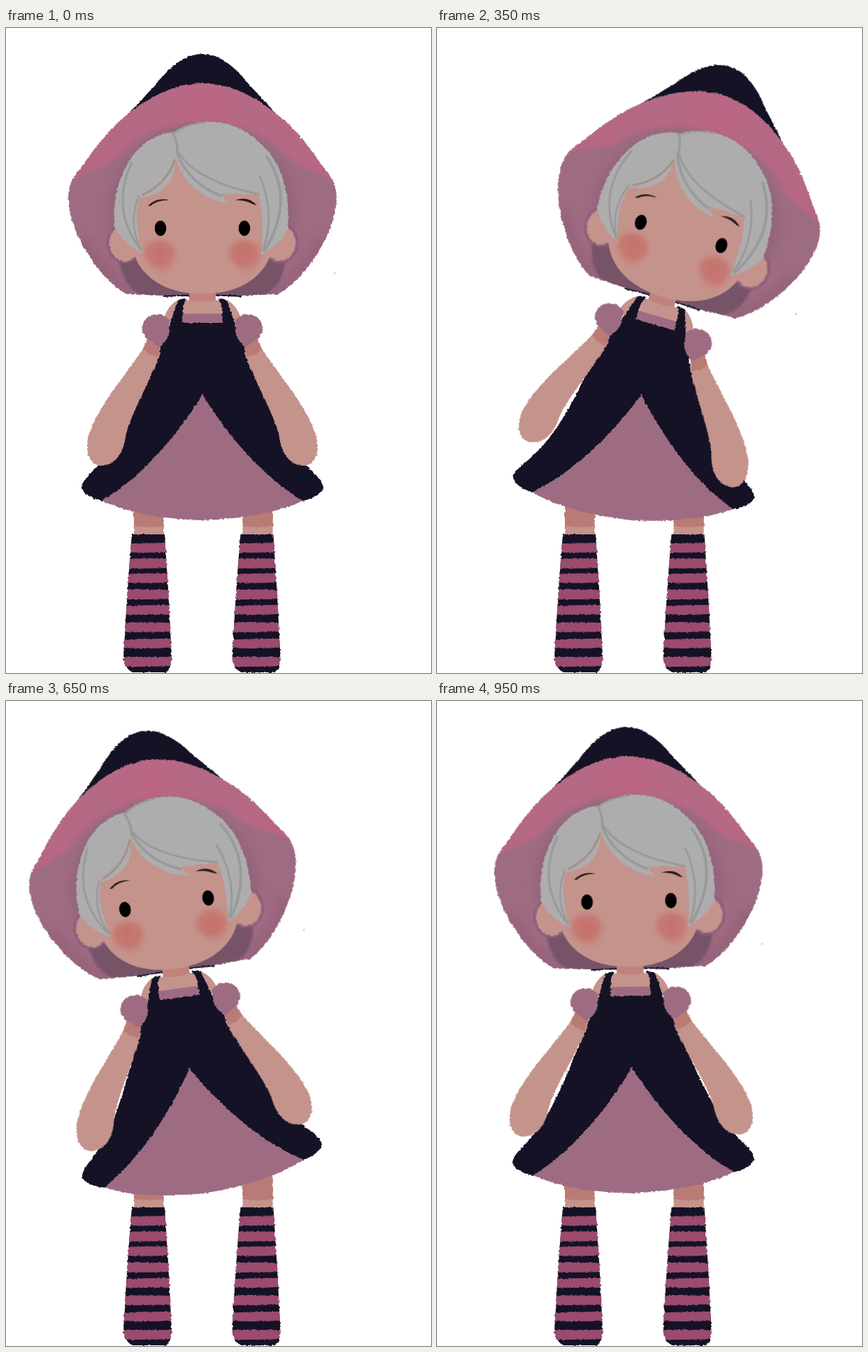
Recreate the animation shown at these times as an HTML page. Size 608 px wide and 921 px high, loop 1 s.

```html
<!DOCTYPE html>
<html lang="en">
<head>
<meta charset="utf-8">
<title>Swaying doll</title>
<style>
html, body { margin: 0; width: 100%; height: 100%; overflow: hidden; background: #fff; }
svg { display: block; width: 608px; height: 921px; }
</style>
</head>
<body>
<svg viewBox="0 0 608 921" xmlns="http://www.w3.org/2000/svg">
  <defs>
    <filter id="rough" x="-5%" y="-5%" width="110%" height="110%" color-interpolation-filters="sRGB">
      <feTurbulence type="fractalNoise" baseFrequency="0.25" numOctaves="2" seed="4"/>
      <feDisplacementMap in="SourceGraphic" scale="3.5" xChannelSelector="R" yChannelSelector="G"/>
    </filter>
    <filter id="soft" x="-20%" y="-20%" width="140%" height="140%"><feGaussianBlur stdDeviation="1.5"/></filter>
    <filter id="haze" x="-30%" y="-30%" width="160%" height="160%"><feGaussianBlur stdDeviation="7"/></filter>
    <radialGradient id="blush">
      <stop offset="0" stop-color="#c6706b"/>
      <stop offset=".6" stop-color="#c6736d" stop-opacity=".8"/>
      <stop offset="1" stop-color="#c6827b" stop-opacity="0"/>
    </radialGradient>
    <radialGradient id="pink" gradientUnits="userSpaceOnUse" cx="281" cy="112" r="190">
      <stop offset="0" stop-color="#bc6583"/>
      <stop offset=".35" stop-color="#b46984"/>
      <stop offset="1" stop-color="#b66683"/>
    </radialGradient>
    <clipPath id="brimClip"></clipPath>
    <clipPath id="sockClip"></clipPath>
  </defs>
  <g id="legs" filter="url(#rough)"></g>
  <g id="hatBone"><g id="hat" filter="url(#rough)"></g></g>
  <g id="neckBone"><g id="neck"></g></g>
  <g id="dress" filter="url(#rough)"></g>
  <g id="armBone">
    <g id="armL"></g>
    <g id="armR"></g>
  </g>
  <g id="faceBone"><g id="face"></g></g>
</svg>
<script>
const NS = 'http://www.w3.org/2000/svg';
const INK = '#151226', PLUM = '#9e6c82', SKIN = '#c4938c', SHADE = '#b97b76';
const HAIR = '#adadad', STRAND = '#959595', STRIPE = '#9a4b6e', DUSK = '#775367';
const MID = 281, HIP = 660, WAIST = 477;
const MIRROR = `translate(${2 * MID}) scale(-1 1)`;
const $ = id => document.getElementById(id);

function add(parent, tag, attrs = {}) {
  const el = document.createElementNS(NS, tag);
  for (const k in attrs) el.setAttribute(k, attrs[k]);
  (typeof parent === 'string' ? $(parent) : parent).appendChild(el);
  return el;
}

const shape = (parent, fill, d, more = {}) => add(parent, 'path', { d, fill, ...more });

// The left half and its reflection; halves overlap by a pixel
function both(parent, fill, d) {
  shape(parent, fill, d);
  shape(parent, fill, d, { transform: MIRROR });
}

function buildLegs() {
  shape('sockClip', INK, 'M180,723 H227 Q233,810 237,898 Q236,917 229,920 H181 Q169,914 168,900 Q173,805 180,723Z');
  for (const dx of [0, 155.5]) {
    const leg = add('legs', 'g', { transform: `translate(${dx})` });
    shape(leg, SKIN, 'M183,675 H226 V727 H183Z');
    shape(leg, SHADE, 'M183,675 H226 V711 Q205,715 183,711Z');
    const sock = add(leg, 'g', { 'clip-path': 'url(#sockClip)' });
    add(sock, 'rect', { x: 160, y: 715, width: 85, height: 206, fill: INK });
    for (let i = 0; i < 8; i++) {
      const y = 736 + 21 * i + .3 * i * i, tilt = i % 2 ? 1 : -1;
      shape(sock, STRIPE, `M160,${y + 1} Q200,${y - 1} 245,${y + tilt} v12 Q205,${y + 15} 160,${y + 13 + tilt}Z`);
    }
  }
}

function buildHat() {
  both('hat', INK, 'M176,122 L214,81 C236,54 256,37 282,37 V140Z');
  both('brimClip', INK, `M282,79 C235,79 195,105 165,131 C140,152 117,187 95,216
    C86,235 88,255 96,280 C110,318 140,362 173,380 L282,384Z`);
  const brim = add('hat', 'g', { 'clip-path': 'url(#brimClip)' });
  add(brim, 'rect', { x: 80, y: 70, width: 402, height: 320, fill: PLUM });
  both(add(brim, 'g', { filter: 'url(#haze)', opacity: .8 }), '#96607c',
    'M90,297 Q125,360 175,388 L208,384 Q140,350 122,300Z');
  both(add(brim, 'g', { filter: 'url(#soft)' }), 'url(#pink)',
    'M282,135 C225,135 185,158 165,178 C145,200 120,203 80,225 L120,60 H282Z');
  add(brim, 'ellipse', { cx: MID, cy: 260, rx: 134, ry: 120, fill: '#8d6079', opacity: .65, filter: 'url(#haze)' });
  both(add(brim, 'g', { filter: 'url(#soft)' }), DUSK,
    'M162,322 C163,352 172,375 200,384 L282,390 V300Z');
  shape('hat', 'none', 'M225,383 Q281,380 337,383', { stroke: INK, 'stroke-width': 2 });
  add('hat', 'circle', { cx: 470.5, cy: 350, r: .8, fill: '#777' });
}

function buildNeck() {
  both('neck', SKIN, 'M262,376 V388 L248,392 V424 H282 V376Z');
  both('neck', SKIN, 'M246,388 Q231,397 226,414 L238,424 L252,392Z');
  shape('neck', '#bf837c', 'M262,374 H300 V388 Q281,394 262,388Z');
  add('neck', 'rect', { x: 250, y: 408, width: 62, height: 18, fill: PLUM });
}

const dressHalves = [
  [INK, `M282,421 L252,421 L253,402 Q253,392 259,387 Q252,385 246,389 Q241,402 235,422 L217,463
    C204,493 190,530 177,555 C165,580 152,602 136,620 C125,634 108,645 108,657 Q114,670 137,675 L282,690Z`],
  [PLUM, 'M282,522 C255,565 205,635 137,675 Q190,700 282,703Z']
];
const dressParts = dressHalves.flatMap(([fill, d]) =>
  [false, true].map(flip => ({ d, flip, el: shape('dress', fill, '') })));

function buildArms() {
  for (const [id, transform] of [['armL', ''], ['armR', MIRROR]]) {
    const arm = add(add(id, 'g', { transform }), 'g', { filter: 'url(#rough)' });
    shape(arm, SKIN, `M199,453 C172,496 116,558 116,597 C116,616 126,625 137,625
      C156,623 168,610 172,578 C180,550 205,505 219,470 L222,450Z`);
    shape(arm, SHADE, 'M203,442 L222,450 L217,470 Q205,467 196,459Z');
    shape(arm, PLUM, 'M234,417 C224,405 196,404 195,430 C196,446 212,446 219,457 Q229,448 233,438Z');
  }
}

// Upper-case shape between an ellipse and a rounded box
function superellipse(cx, cy, rx, ry, power, steps = 72) {
  const bow = v => Math.sign(v) * Math.abs(v) ** (2 / power);
  const points = Array.from({ length: steps }, (_, i) => {
    const a = i / steps * 2 * Math.PI;
    return [cx + rx * bow(Math.cos(a)), cy + ry * bow(Math.sin(a))].map(v => v.toFixed(2));
  });
  return 'M' + points.join('L') + 'Z';
}

function buildFace() {
  const ears = add('face', 'g', { filter: 'url(#rough)' });
  for (const side of [-1, 1]) {
    const cx = MID + 112 * side;
    add(ears, 'ellipse', {
      cx, cy: 308, rx: 23, ry: 27, fill: SKIN, stroke: '#84597a', 'stroke-opacity': .75,
      'stroke-width': 4, transform: `rotate(${12 * side} ${cx} 308)`
    });
  }
  shape('face', SKIN, superellipse(MID, 295, 102, 84.5, 2.2));
  shape('face', SKIN, superellipse(MID, 235, 98, 75, 2));
  for (const cx of [220, 341]) {
    add('face', 'ellipse', { cx, cy: 322, rx: 29, ry: 25, fill: 'url(#blush)' });
    add('face', 'ellipse', { cx: cx + 3, cy: 337, rx: 20, ry: 17, fill: 'url(#blush)', opacity: .35 });
  }

  const hair = add('face', 'g', { filter: 'url(#rough)' });
  shape(hair, HAIR, `M155,283 C153,248 160,212 180,184 C196,162 220,149 240,149 C252,138 275,133 300,134
    C336,137 369,162 388,195 C401,220 406,256 403,288 C395,303 381,315 366,324
    C367,296 368,265 362,238 Q335,236 308,237 L319,251 C284,245 255,226 242,184
    C244,216 229,238 191,243 Q181,280 197,322 C180,315 162,300 155,283Z`);
  const strands = add('face', 'g', { opacity: .8, 'stroke-linecap': 'round' });
  const strand = (width, d, stroke = STRAND) => shape(strands, 'none', d, { stroke, 'stroke-width': width });
  strand(3.5, 'M238,150 Q246,160 245,180 Q262,222 308,240');
  strand(3, 'M246,176 Q270,218 361,237');
  strand(3, 'M241,189 Q230,222 196,238', '#a58783');
  strand(3, 'M180,192 Q148,260 194,318');
  strand(2.5, 'M190,240 Q174,280 193,315');
  strand(4, 'M373,184 Q414,245 370,318');
  strand(3, 'M363,212 Q386,265 368,317');
  strand(2, 'M240,151 Q258,137 285,135');

  shape('face', '#29201f', 'M203,254 Q216,241 234,246 Q217,245 207,254Z');
  shape('face', '#29201f', 'M328,246 Q346,239 359,253 L354,252 Q342,245 328,246Z');
  for (const cx of [221, 341]) add('face', 'ellipse', { cx, cy: 286, rx: 8.3, ry: 11, fill: '#000' });
}

// Straight moves from rest to a right lean, a left lean and the end value
function track(t, right, left, end, endTime) {
  const keys = [[0, 0], [1000 / 3, right], [2000 / 3, left], [endTime, end]];
  for (let i = 1; i < keys.length; i++) {
    const [t0, a] = keys[i - 1], [t1, b] = keys[i];
    if (t <= t1) return a + (b - a) * (t - t0) / (t1 - t0);
  }
  return end;
}

function spin([x, y], deg, cy) {
  const a = deg * Math.PI / 180, c = Math.cos(a), s = Math.sin(a);
  return [MID + (x - MID) * c - (y - cy) * s, cy + (x - MID) * s + (y - cy) * c];
}

// The dress bends gradually between hip and chest
function bend(p, hip, chest) {
  const u = Math.max(0, Math.min(1, (530 - p[1]) / 90));
  const w = u * u * (3 - 2 * u);
  const low = spin(p, hip, HIP);
  const high = spin(spin(p, chest - hip, WAIST), hip, HIP);
  return low.map((v, i) => v + (high[i] - v) * w);
}

function draw(t) {
  const hip = track(t, 5.5, -8.6, 0, 985);
  const chest = track(t, 17.4, -9.2, 0, 985);
  const armL = track(t, 11.5, -6.2, 4.5, 1000);
  const armR = track(t, 9.8, -9.3, -2.3, 1000);
  const pose = `rotate(${hip} ${MID} ${HIP}) rotate(${chest - hip} ${MID} ${WAIST})`;
  for (const id of ['hatBone', 'neckBone', 'armBone', 'faceBone']) $(id).setAttribute('transform', pose);
  $('armL').setAttribute('transform', `rotate(${armL - chest} 214 430)`);
  $('armR').setAttribute('transform', `rotate(${armR - chest} 348 430)`);
  for (const { d, flip, el } of dressParts) {
    el.setAttribute('d', d.replace(/([\d.]+),([\d.]+)/g, (_, x, y) =>
      bend([flip ? 2 * MID - x : +x, +y], hip, chest).map(v => v.toFixed(2)).join()));
  }
}

buildLegs();
buildHat();
buildNeck();
buildArms();
buildFace();

const STEP = 50, LOOP = 1000;
let shown = -1;
function tick() {
  const t = Math.floor(performance.now() % LOOP / STEP) * STEP;
  if (t !== shown) draw(shown = t);
  requestAnimationFrame(tick);
}
tick();
</script>
</body>
</html>
```
